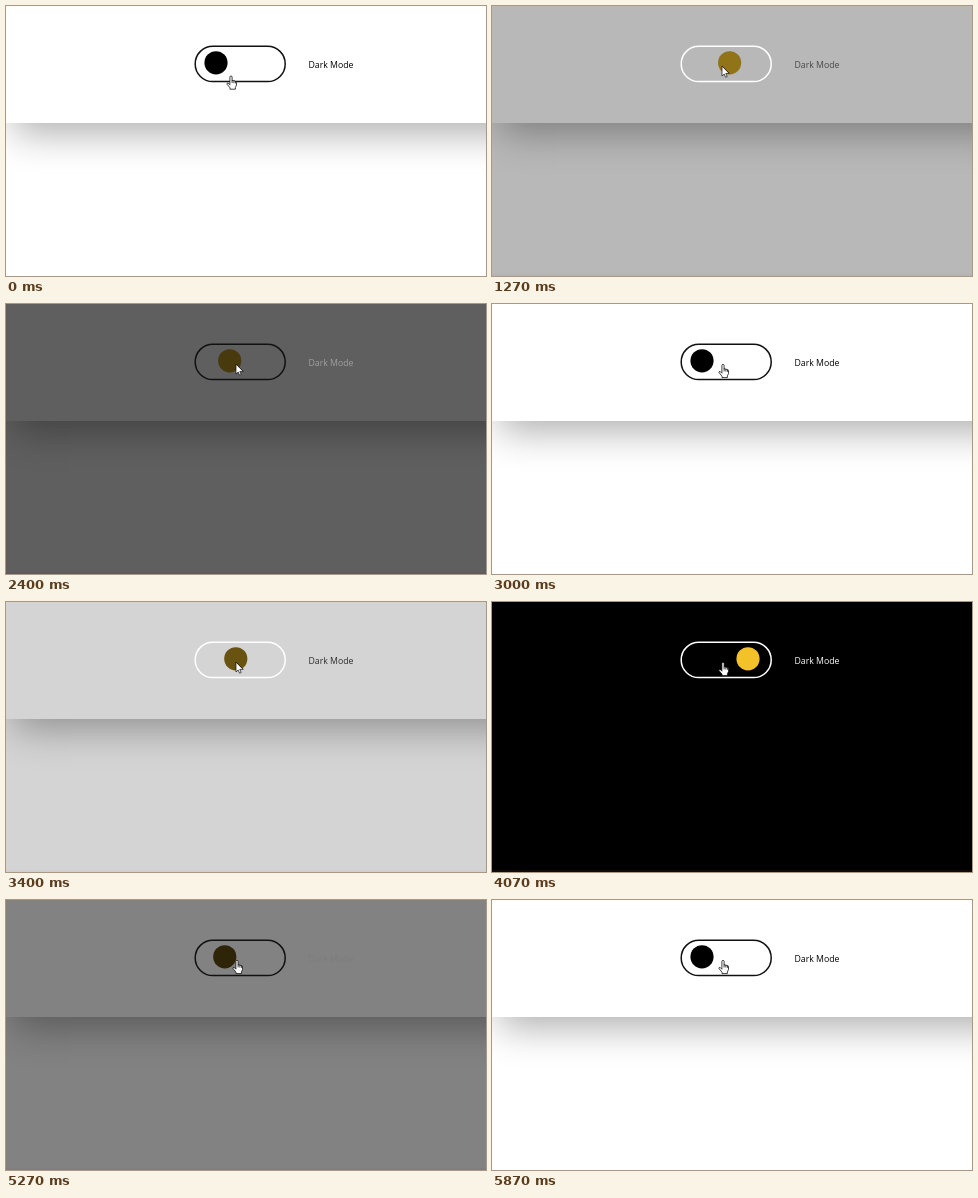
Recreate the animation shown at these times as an HTML page. Size 480 px wide and 270 px high, loop 5.94 s.

```html
<!DOCTYPE html>
<html lang="en">
<head>
<meta charset="utf-8">
<title>Dark mode switch</title>
<style>
  html, body { margin: 0; width: 100%; height: 100%; overflow: hidden; }
  #stage { position: relative; width: 480px; height: 270px; overflow: hidden; }
  #panel {
    position: absolute; left: 0; top: -40px; width: 520px; height: 157px;
    background: inherit; box-shadow: 8px 10px 36px rgba(0, 0, 0, .32);
  }
  #edge {
    position: absolute; bottom: 0; width: 100%; height: 2px;
    background: rgba(110, 55, 70, .16);
  }
  svg { position: absolute; left: 0; top: 0; }
  text { font: 8.75px "Open Sans", "Noto Sans", sans-serif; }
  #hand, #arrow { fill: #fff; stroke: #111; stroke-linejoin: round; stroke-linecap: round; }
</style>
</head>
<body>
<div id="stage">
  <div id="panel"></div>
  <div id="edge"></div>
  <svg width="480" height="270">
    <rect id="track" x="189.2" y="40.2" width="90" height="35.4" rx="17.7" fill="none" stroke-width="1.5"/>
    <circle id="knob" cy="56.8" r="11.6"/>
    <text id="label" x="302.4" y="62">Dark Mode</text>
    <g id="cursor">
      <path id="hand" stroke-width=".8" d="M-1.1 8.4V1Q-1.1 0 0 0T1.1 1V4.6Q2.4 3.9 2.9 5
        Q4.1 4.4 4.5 5.5Q5.5 5.2 5.5 6.4V9.2L4.4 11.4V13.2H-1V11.8L-4 8.2Q-4.4 7.2 -3.3 7Z
        M1.1 4.6V6.6M2.9 5V6.8M4.5 5.5V7"/>
      <path id="arrow" stroke-width=".7" d="M-1 0V9.6L1.2 7.6L2.6 10.8L4.2 10.1L2.8 7H5.9Z"/>
    </g>
  </svg>
</div>
<script>
const LOOP = 5940, FADE = 500, STEP = 1000 / 15;
const YELLOW = [243, 194, 40];
const clicks = [1093, 2193, 3270, 5013];   // alternately to dark and to light

const $ = id => document.getElementById(id);
const clamp = x => Math.min(1, Math.max(0, x));
const ramp = (t, from, to) => clamp((t - from) / (to - from));
const mix = (a, b, k) => a + (b - a) * k;
const rgb = c => `rgb(${c.map(Math.round)})`;
const gray = v => rgb([v, v, v]);
const smooth = x => x * x * (3 - 2 * x);

// CSS "ease": cubic-bezier(.25, .1, .25, 1)
function ease(x) {
  const curve = (s, a, b) => 3 * s * (1 - s) ** 2 * a + 3 * s * s * (1 - s) * b + s ** 3;
  let lo = 0, hi = 1;
  for (let i = 0; i < 20; i++) {
    const mid = (lo + hi) / 2;
    if (curve(mid, .25, .25) < x) lo = mid; else hi = mid;
  }
  return curve(hi, .1, 1);
}

function draw(t) {
  const count = clicks.filter(c => t >= c).length;
  const isDark = count % 2 === 1;
  const progress = count ? ramp(t, clicks[count - 1], clicks[count - 1] + FADE) : 1;
  const toDark = k => isDark ? k : 1 - k;
  const page = toDark(smooth(progress));
  const slide = toDark(ease(progress));
  const knobX = mix(210, 256, slide);

  $('stage').style.background = gray(255 * (1 - page));
  $('edge').style.opacity = page;
  $('label').setAttribute('fill', gray(255 * page));
  $('track').setAttribute('stroke', isDark ? '#fff' : '#111');
  $('knob').setAttribute('cx', knobX);
  $('knob').setAttribute('fill', rgb(YELLOW.map(c => c * slide)));

  const up = ramp(t, 0, 270), over = ramp(t, 660, 800);
  const x = 225 + 6 * over, y = 70 - 18 * up + 8.4 * over;
  $('cursor').setAttribute('transform', `translate(${x} ${y})`);

  // The knob itself has no pointer cursor
  const onKnob = Math.hypot(knobX - x, 56.8 - y) < 11.7 && over === 1;
  $('arrow').style.display = onKnob ? '' : 'none';
  $('hand').style.display = onKnob ? 'none' : '';
}

function tick() {
  const t = performance.now() % LOOP;
  draw(Math.floor((t + 2) / STEP) * STEP);
  requestAnimationFrame(tick);
}
tick();
</script>
</body>
</html>
```
